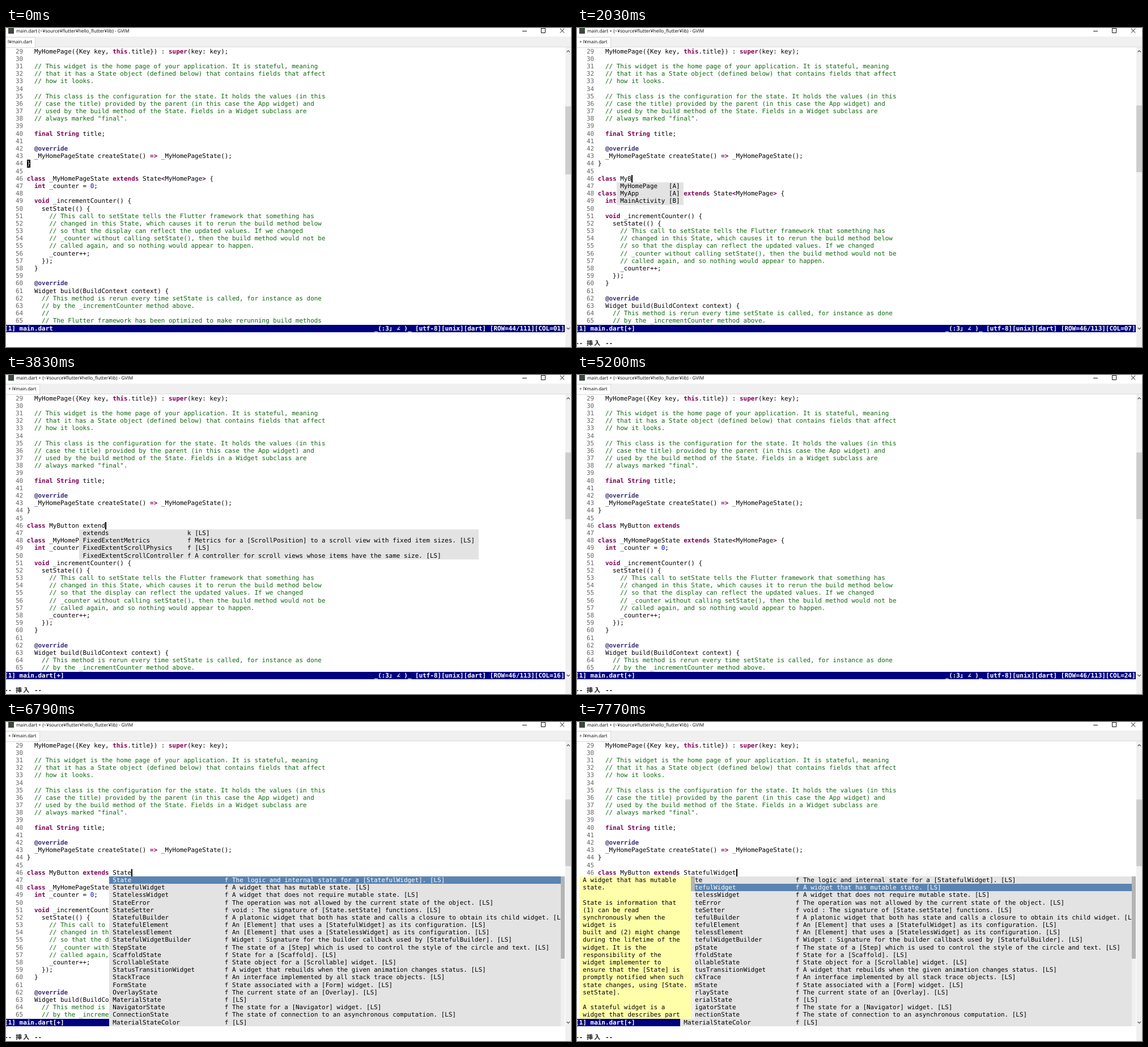
Animation of 997 by 562 pixels, one loop 8000 ms. Source, as an HTML page:

```html
<!DOCTYPE html>
<html lang="ja">
<head>
<meta charset="utf-8">
<title>main.dart</title>
<style>
html, body { margin: 0; width: 100%; height: 100%; overflow: hidden; background: #fff; }
#win, #win svg, #screen, #screen div { position: absolute; left: 0; top: 0; }
#win { width: 997px; height: 562px; overflow: hidden; text-rendering: geometricPrecision; }
#win svg text { font-family: "Open Sans", "Noto Sans", sans-serif; }
#screen div {
  white-space: pre; overflow: hidden; color: #000;
  font: 10.946px/13.19px "DejaVu Sans Mono", "Noto Sans CJK JP", monospace;
}
#screen .num { color: #666; }
#screen .bar { background: #000080; color: #fff; font-weight: bold; }
#screen .mode { color: #222; font-weight: bold; }
#screen .cur { background: #000; color: #fff; }
#screen .pum { background: #e3e3e3; }
#screen .sel { background: #5a84b1; color: #fff; }
#screen .doc { background: #ffffaa; }
#screen .trough { background: #f0f0f0; }
#screen .thumb { background: #b4b4b4; }
.c { color: #106810; }
.k { color: #7f0055; font-weight: bold; }
.a { color: #3b2c78; font-weight: bold; }
.n { color: #0000c0; }
</style>
</head>
<body>
<div id="win">
  <svg width="997" height="562">
    <rect y="15" width="997" height="19" fill="#f0f0f0"/>
    <path d="M0 33.5H997" stroke="#dcdcdc"/>
    <rect id="tab" x="-1" y="16.5" height="18" fill="#fff" stroke="#d9d9d9"/>
    <rect x="4" y="0" width="10" height="10" fill="#3c483c"/>
    <text id="title" x="18" y="8" font-size="8.2"></text>
    <text id="tabText" y="27" font-size="8"></text>
    <path d="M911 5.5h8M944.5 .5h7v8h-7zM978 1l7 7.5M985 1l-7 7.5" fill="none" stroke="#111"/>
    <rect x="987" y="34" width="10" height="528" fill="#f0f0f0"/>
    <rect id="thumb" x="987" width="10" fill="#cdcdcd"/>
    <path d="M989.5 42.5l2.7-2.7 2.7 2.7M989.5 528l2.7 2.7 2.7-2.7" fill="none" stroke="#505050" stroke-width="1.2"/>
  </svg>
  <div id="screen"></div>
</div>
<script>
const LOOP = 8000, CW = 6.59, CH = 13.19, X0 = -2.8, Y0 = 34.55;
const $ = id => document.getElementById(id);
const lines = s => s.split('\n').slice(1, -1);

const CODE = lines(`
  MyHomePage({Key key, this.title}) : super(key: key);

  // This widget is the home page of your application. It is stateful, meaning
  // that it has a State object (defined below) that contains fields that affect
  // how it looks.

  // This class is the configuration for the state. It holds the values (in this
  // case the title) provided by the parent (in this case the App widget) and
  // used by the build method of the State. Fields in a Widget subclass are
  // always marked "final".

  final String title;

  @override
  _MyHomePageState createState() => _MyHomePageState();
}

class _MyHomePageState extends State<MyHomePage> {
  int _counter = 0;

  void _incrementCounter() {
    setState(() {
      // This call to setState tells the Flutter framework that something has
      // changed in this State, which causes it to rerun the build method below
      // so that the display can reflect the updated values. If we changed
      // _counter without calling setState(), then the build method would not be
      // called again, and so nothing would appear to happen.
      _counter++;
    });
  }

  @override
  Widget build(BuildContext context) {
    // This method is rerun every time setState is called, for instance as done
    // by the _incrementCounter method above.
    //
    // The Flutter framework has been optimized to make rerunning build methods
`);

const MY = lines(`
MyHomePage|[A]
MyApp|[A]
MainActivity|[B]
`);
const EXTEND = lines(`
extends|k [LS]
FixedExtentMetrics|f Metrics for a [ScrollPosition] to a scroll view with fixed item sizes. [LS]
FixedExtentScrollPhysics|f [LS]
FixedExtentScrollController|f A controller for scroll views whose items have the same size. [LS]
external|k [LS]
`);
const ST = lines(`
State|f The logic and internal state for a [StatefulWidget]. [LS]
Step|f A material step used in [Stepper]. [LS]
Stack|f A widget that positions its children relative to the edges of its box. [LS]
Stream|f A source of asynchronous data events. [LS]
String|f A sequence of UTF-16 code units. [LS]
Stepper|f A material stepper widget. [LS]
StackTrace|f An interface implemented by all stack trace objects. [LS]
StateSetter|f void : The signature of [State.setState] functions. [LS]
StadiumBorder|f [LS]
StatefulBuilder|f A platonic widget that both has state and calls a closure to obtain its child widget. [LS]
StatefulElement|f An [Element] that uses a [StatefulWidget] as its configuration. [LS]
StateError|f The operation was not allowed by the current state of the object. [LS]
StepperType|f [LS]
StreamView|f [LS]
StrokeJoin|f [LS]
StatelessWidget|f A widget that does not require mutable state. [LS]
StrokeCap|f [LS]
StepState|f The state of a [Step] which is used to control the style of the circle and text. [LS]
Stopwatch|f [LS]
ScaffoldState|f State for a [Scaffold]. [LS]
`);
const STATE = lines(`
State|f The logic and internal state for a [StatefulWidget]. [LS]
StatefulWidget|f A widget that has mutable state. [LS]
StatelessWidget|f A widget that does not require mutable state. [LS]
StateError|f The operation was not allowed by the current state of the object. [LS]
StateSetter|f void : The signature of [State.setState] functions. [LS]
StatefulBuilder|f A platonic widget that both has state and calls a closure to obtain its child widget. [LS]
StatefulElement|f An [Element] that uses a [StatefulWidget] as its configuration. [LS]
StatelessElement|f An [Element] that uses a [StatelessWidget] as its configuration. [LS]
StatefulWidgetBuilder|f Widget : Signature for the builder callback used by [StatefulBuilder]. [LS]
StepState|f The state of a [Step] which is used to control the style of the circle and text. [LS]
ScaffoldState|f State for a [Scaffold]. [LS]
ScrollableState|f State object for a [Scrollable] widget. [LS]
StatusTransitionWidget|f A widget that rebuilds when the given animation changes status. [LS]
StackTrace|f An interface implemented by all stack trace objects. [LS]
FormState|f State associated with a [Form] widget. [LS]
OverlayState|f The current state of an [Overlay]. [LS]
MaterialState|f [LS]
NavigatorState|f The state for a [Navigator] widget. [LS]
ConnectionState|f The state of connection to an asynchronous computation. [LS]
MaterialStateColor|f [LS]
`);

const ABOUT = `State is information that
(1) can be read
synchronously when the
widget is
built and (2) might change
during the lifetime of the
widget. It is the
responsibility of the
widget implementer to
ensure that the [State] is
promptly notified when such
state changes, using [State.
setState].
`;
const DOC_STATE = lines(`
The logic and internal
state for a
[StatefulWidget].

${ABOUT}
[State] objects are created
`);
const DOC_WIDGET = lines(`
A widget that has mutable
state.

${ABOUT}
A stateful widget is a
widget that describes part
`);

// One entry per key press
const TEXT = 'class MyButton extends State';
const KEYS = [610, 780, 980, 1150, 1270, 1410, 1610, 1830, 2000, 2160, 2330, 2460, 2590, 2720,
  2780, 2950, 3140, 3310, 3660, 3750, 3830, 3980, 4180, 5470, 5600, 5740, 5880, 6020];

const esc = s => s.replace(/&/g, '&amp;').replace(/</g, '&lt;').replace(/>/g, '&gt;');
const TOKEN = /(\/\/.*)|(\b(?:class|extends|final|String|this|super|int|void)\b|=>|[<>])|(@\w+)|(\b\d+\b)|[^\/<>=@\w]+|\w+|./g;
const paint = s => s.replace(TOKEN, (m, c, k, a, n) => {
  const cls = c ? 'c' : k ? 'k' : a ? 'a' : n ? 'n' : '';
  return cls ? `<span class="${cls}">${esc(m)}</span>` : esc(m);
});

let out = '';
function cell(row, col, html, cls = '', w = 0, h = 1) {
  const size = w ? `width:${w * CW}px;height:${h * CH}px;` : '';
  out += `<div class="${cls}" style="left:${X0 + col * CW}px;top:${Y0 + row * CH}px;${size}">${html}</div>`;
}

const itemText = (item, pad) => {
  const [name, info = ''] = item.split('|');
  return esc(' ' + name.padEnd(pad) + info);
};
function menu(col, items, pad, w, sel = -1) {
  items.forEach((s, i) => cell(18 + i, col, itemText(s, pad), i === sel ? 'sel' : 'pum', w));
}
function menuBar(h, thumb) {
  cell(18, 149, '', 'trough', 1, h);
  cell(18, 149, '', 'thumb', 1, thumb);
}
function doc(text, thumb) {
  for (let i = 0; i < 19; i++) cell(18 + i, 1, ' ' + (text[i] || ''), 'doc', 30);
  cell(18, 31, '', 'trough', 1, 19);
  cell(18, 31, '', 'thumb', 1, thumb);
}

function status(t, added, typed) {
  let col = typed + 1;
  if (t >= 1610 && t < 2160) col = 7;
  if (t >= 2950 && t < 4180) col = t < 3140 ? 15 : 16;
  cell(37, 0, '[1] main.dart' + (added ? '[+]' : ''), 'bar', 150);
  cell(37, 99, '_(:3」', 'bar');
  cell(37, 105, '∠', 'bar');
  cell(37, 107, ')_', 'bar');
  cell(37, 110, `[utf-8][unix][dart] [ROW=${44 + added}/${111 + added}][COL=${String(col).padStart(2, '0')}]`, 'bar');
  if (added) {
    cell(39, 0, '--', 'mode');
    cell(39, 3, '挿', 'mode');
    cell(39, 5, '入', 'mode');
    cell(39, 8, '--', 'mode');
  }
}

function popups(t, code) {
  const within = (a, b) => t >= a && t < b;
  if (within(980, 1270)) menu(5, ['class|[A]'], 6, 11);
  if (within(1830, 2160)) menu(11, MY, 13, 18);
  if (within(3310, 3750)) menu(20, EXTEND, 28, 107);
  if (within(3750, 4010)) menu(20, EXTEND.slice(0, 4), 28, 107);
  if (within(4010, 4180)) menu(20, EXTEND.slice(0, 1), 28, 107);
  if (within(5620, 6230)) menu(28, ST, 27, 121);
  if (within(6230, 6270)) {
    // Half repainted: the older list survives only over existing text
    ST.forEach((s, i) => {
      const w = i === 19 ? 121 : code[18 + i].length - 22;
      if (i > 5 && w > 0) cell(18 + i, 28, itemText(s, 27), 'pum', w);
    });
    menu(28, STATE.slice(0, 6), 30, 121);
    menuBar(6, 6);
  }
  if (t < 6270) return;
  const sel = t < 6790 ? -1 : t < 7460 ? 0 : 1;
  const partial = within(7300, 7330) || within(7460, 7490);
  const info = () => t >= 7740 ? doc(DOC_WIDGET, 2) : doc(DOC_STATE, 4);
  if (partial) info();
  menu(28, partial ? [STATE[0], 'StatefulWidget'] : STATE, 30, 121, sel);
  menuBar(partial ? 1 : 20, partial ? 1 : 11);
  if (t >= 7300 && !partial) info();
}

function render(t) {
  out = '';
  const added = t < 150 ? 0 : t < 370 ? 1 : 2;
  const typed = KEYS.filter(k => k <= t).length;
  const text = TEXT.slice(0, typed) + (t >= 7460 ? 'fulWidget' : '');
  const fresh = added === 2 ? ['', text] : added ? [''] : [];
  const code = [...CODE.slice(0, 16), ...fresh, ...CODE.slice(16)].slice(0, 37);
  code.forEach((s, i) => {
    cell(i, 3, 29 + i, 'num');
    if (s) cell(i, 6, paint(s));
  });
  status(t, added, typed);
  popups(t, code);

  const hidden = (t >= 5200 && t < 5470) || (t >= 7300 && t < 7330);
  if (!added) cell(15, 6, '}', 'cur', 1);
  else if (!hidden) cell(15 + added, 6 + text.length, '', 'cur', 0.33);
  return added;
}

let shown = '';
function frame() {
  const added = render(performance.now() % LOOP);
  if (out !== shown) {
    $('screen').innerHTML = shown = out;
    $('title').textContent = `main.dart ${added ? '+ ' : ''}(~¥source¥flutter¥hello_flutter¥lib) - GVIM`;
    $('tabText').textContent = (added ? '+ ' : '') + 'l¥main.dart';
    $('tabText').setAttribute('x', added ? 4 : 3);
    $('tab').setAttribute('width', added ? 60.5 : 52.5);
    $('thumb').setAttribute('y', added ? 136.5 : 138);
    $('thumb').setAttribute('height', added ? 117.5 : 120);
  }
  requestAnimationFrame(frame);
}
frame();
</script>
</body>
</html>
```
